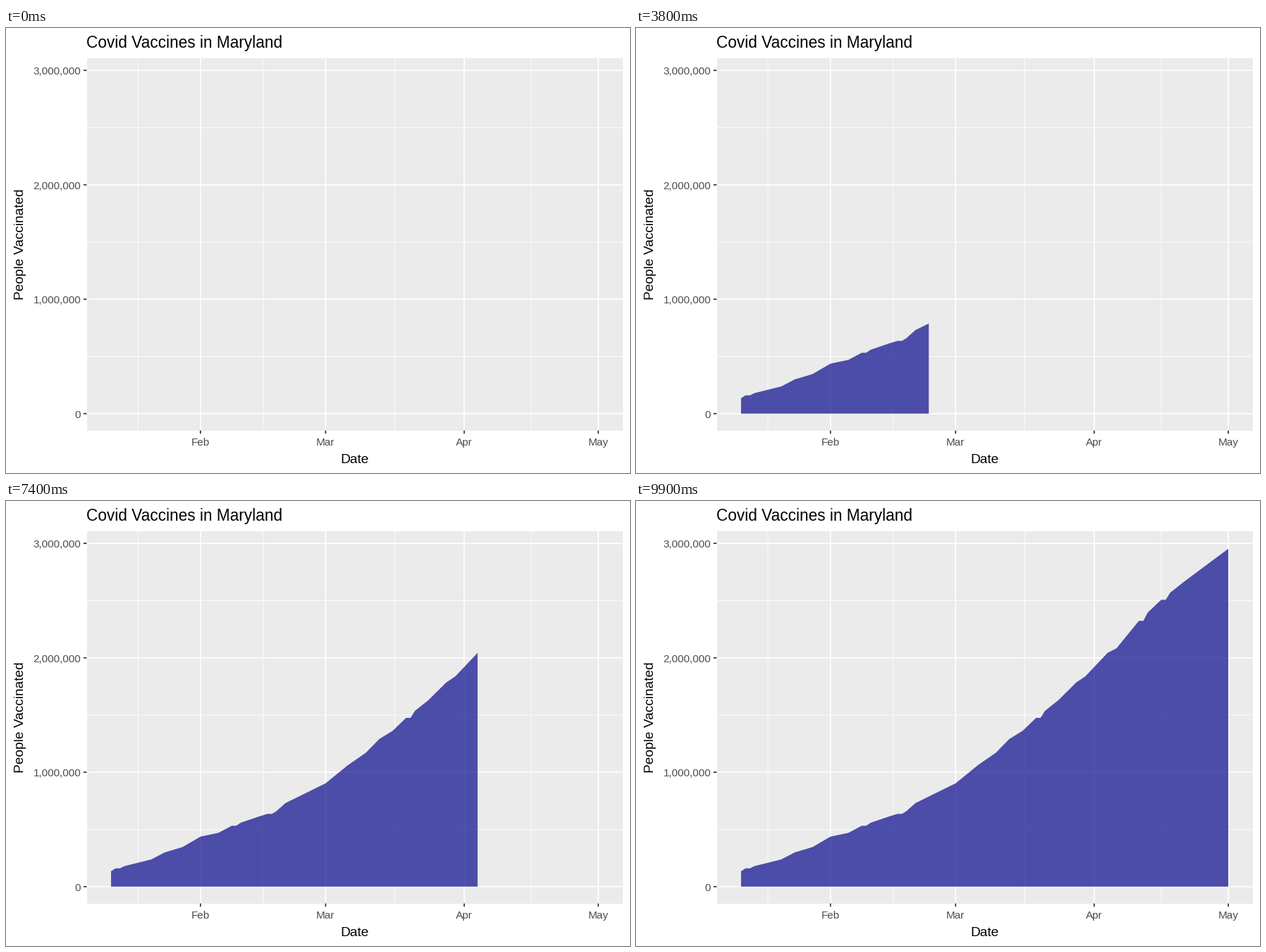
These frames come from a looping animation (885x632 px, 10 s). A matplotlib script:

```python
import numpy as np
import matplotlib.pyplot as plt
from matplotlib.animation import FuncAnimation
from matplotlib.patches import Polygon, Rectangle

W, H, DPI = 885, 632, 100
FRAMES, INTERVAL = 100, 100
LAST_DAY = 109                       # 12 January is day 0, 1 May the last
LEFT, RIGHT, TOP, BOTTOM = 114.5, 874.6, 42.6, 571.6
MAJOR, MINOR, TICK = 1.7, 0.85, 4.6  # line widths and tick length in pixels
TITLE, AXIS, SMALL = 22.6, 19.2, 15.3

# Trend through a few (day, thousand people) points
TREND = [(0, 135), (1, 160), (9, 238), (12, 299), (16, 346), (20, 437),
         (24, 470), (27, 532), (33, 612), (37, 660), (39, 730), (48, 903),
         (53, 1062), (57, 1170), (60, 1290), (63, 1362), (66, 1475),
         (71, 1630), (75, 1785), (77, 1837), (82, 2043), (84, 2083),
         (89, 2323), (94, 2507), (99, 2662), (LAST_DAY, 2953)]
NO_REPORT = [2, 28, 36, 67, 90, 95]  # days that repeat the day before


def day_x(day):
    return 149 + 691 / LAST_DAY * day


def count_y(millions):
    return 547.7 - 162.5 * millions


def px(size):
    return size * 72 / DPI


days = np.arange(LAST_DAY + 1)
people = np.interp(days, *zip(*TREND))
for day in NO_REPORT:
    people[day] = people[day - 1]
xs, ys = day_x(days), count_y(people / 1000)
# Each day shows up in the frame nearest to its share of the time span
shown_at = np.round(days * (FRAMES - 1) / LAST_DAY)

plt.rcParams["font.family"] = "Liberation Sans"
fig = plt.figure(figsize=(W / DPI, H / DPI), dpi=DPI, facecolor="white")
ax = fig.add_axes([0, 0, 1, 1])
ax.set_xlim(0, W)
ax.set_ylim(H, 0)
ax.axis("off")


def line(x, y, width, color="white"):
    ax.plot(x, y, color=color, lw=px(width), solid_capstyle="butt",
            snap=False, zorder=1)


def label(x, y, text, size, color="black", ha="center", **kw):
    ax.text(x, y, text, fontsize=px(size), color=color, ha=ha,
            va="baseline", **kw)


ax.add_patch(Rectangle((LEFT, TOP), RIGHT - LEFT, BOTTOM - TOP,
                       fc="#EBEBEB", lw=0, zorder=0))

for day in (6, 34, 63.5, 94):
    line([day_x(day)] * 2, [TOP, BOTTOM], MINOR)
for millions in (0.5, 1.5, 2.5):
    line([LEFT, RIGHT], [count_y(millions)] * 2, MINOR)

for day, month in ((20, "Feb"), (48, "Mar"), (79, "Apr"), (109, "May")):
    x = day_x(day)
    line([x, x], [TOP, BOTTOM], MAJOR)
    line([x, x], [BOTTOM, BOTTOM + TICK], MAJOR, "#333333")
    label(x, 592.6, month, SMALL, "#4D4D4D")

for millions in range(4):
    y = count_y(millions)
    line([LEFT, RIGHT], [y, y], MAJOR)
    line([LEFT - TICK, LEFT], [y, y], MAJOR, "#333333")
    label(106.3, y + 6, f"{millions * 10**6:,}", SMALL, "#4D4D4D", "right")

label(LEFT, 28.4, "Covid Vaccines in Maryland", TITLE, ha="left")
label((LEFT + RIGHT) / 2, 618.2, "Date", AXIS)
label(25.2, (TOP + BOTTOM) / 2, "People Vaccinated", AXIS,
      rotation=90, rotation_mode="anchor")

area = Polygon([(xs[0], count_y(0))], closed=True, fc="#09098E", alpha=0.7,
               lw=0, zorder=2)
ax.add_patch(area)


def update(frame):
    n = np.count_nonzero(shown_at <= frame)
    x = np.r_[xs[0], xs[:n], xs[n - 1]]
    y = np.r_[count_y(0), ys[:n], count_y(0)]
    area.set_xy(np.column_stack([x, y]))
    area.set_visible(n > 1)
    return [area]


anim = FuncAnimation(fig, update, frames=FRAMES, interval=INTERVAL,
                     repeat=True, repeat_delay=0)
plt.show()
```
